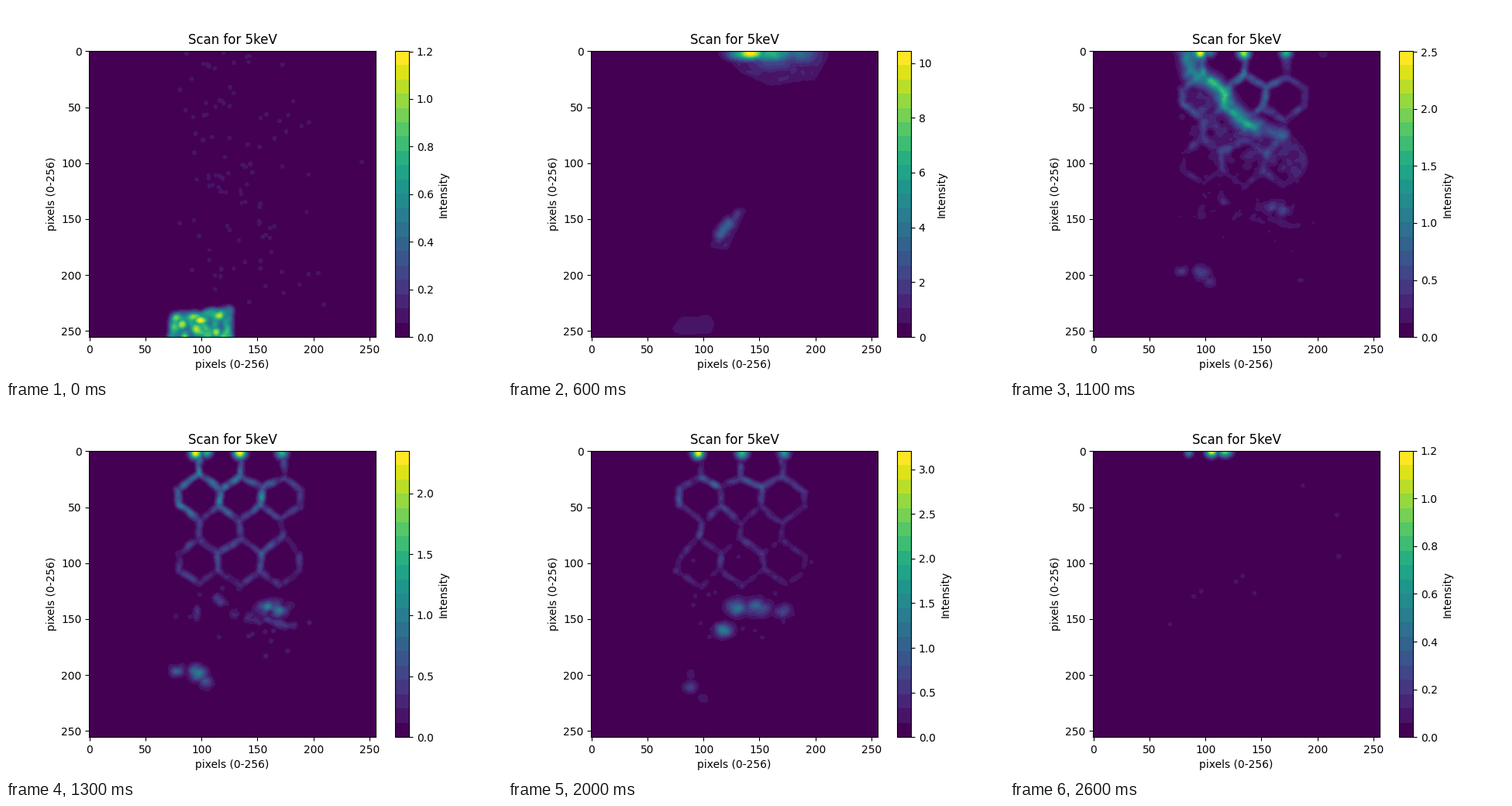
Animation of 640 by 480 pixels, one loop 2.7 s. Source, as a matplotlib script:

```python
import numpy as np
import matplotlib.pyplot as plt
from matplotlib.animation import FuncAnimation
from matplotlib.path import Path

N = 256
FRAMES, INTERVAL = 27, 100
BANDS = 20
TOP = 58

# Shapes are placed in stage pixels; the grid maps them onto the scan.
STEP = 369.6 / N
PIX = STEP * (np.arange(N) + 0.5)
X, Y = np.meshgrid(107.2 + PIX, 57.6 + PIX)


def blur(a, s):
    i = np.arange(N)
    k = np.exp(-((i[:, None] - i) / s) ** 2 / 2)
    k /= k.sum(axis=1, keepdims=True)
    return k @ a @ k.T


def rough(field, seed, depth, size=2.4):
    """Make a field lumpy with smooth noise."""
    n = blur(np.random.default_rng(seed).normal(size=(N, N)), size)
    return field * np.clip(1 + depth * n / n.std(), 0.1, None)


def blob(x, y, amp, sx, sy=None):
    sy = sy or sx
    return amp * np.exp(-((X - x) / sx) ** 2 / 2 - ((Y - y) / sy) ** 2 / 2)


def scatter(seed, count, amp, xs, ys):
    """Single counts: triangular spread in x, even spread in y."""
    rng = np.random.default_rng(seed)
    spots = zip(rng.triangular(*xs, count), rng.uniform(*ys, count))
    return np.max([blob(x, y, amp, 2.7) for x, y in spots], axis=0)


def stroke(amp, width, *pts):
    """Soft line through the points."""
    d2 = np.full((N, N), np.inf)
    for (x0, y0), (x1, y1) in zip(pts, pts[1:]):
        dx, dy = x1 - x0, y1 - y0
        t = np.clip(((X - x0) * dx + (Y - y0) * dy) / (dx * dx + dy * dy), 0, 1)
        d2 = np.minimum(d2, (X - x0 - t * dx) ** 2 + (Y - y0 - t * dy) ** 2)
    return amp * np.exp(-d2 / (2 * width ** 2))


def patch(amp, soft, *pts):
    """Soft-edged polygon."""
    grid = np.column_stack([X.ravel(), Y.ravel()])
    inside = Path(pts).contains_points(grid).reshape(N, N).astype(float)
    return amp * blur(inside, soft)


def honeycomb(seed, amp, rows=4, cols=7):
    """Hanging net of hexagons that fades downwards and to the right."""
    rng = np.random.default_rng(seed)
    node = {(k, j): (222 + 26.6 * j + rng.normal(0, 2),
                     90 + 41 * k + 18 * ((j + k) % 2 == 0) + rng.normal(0, 2))
            for k in range(rows) for j in range(cols)}
    parts = []
    for (k, j), here in node.items():
        ends = [node.get((k, j + 1))]
        if (j + k) % 2 == 0:
            ends.append(node.get((k + 1, j)))
        elif k == 0:
            ends.append((here[0], TOP))
        fade = 0.82 ** k * (0.65 if j > 4 else 1)
        parts += [stroke(amp * fade * rng.uniform(0.6, 1.15), 3.5, here, end)
                  for end in ends if end]
    return rough(np.max(parts, axis=0), seed, 0.28)


def drops(*amps):
    """Bright beads where the net hangs from the upper edge."""
    return np.max([blob(x, TOP + 3, a, 5.5) for x, a in zip((245, 302, 356), amps)], axis=0)


def layers(*parts):
    f = np.max(parts, axis=0)
    return f / f.max()


def block():
    body = patch(0.72, 2.2, (213, 397), (250, 394), (292, 388), (292, 450), (207, 450))
    return layers(
        rough(body, 3, 0.22),
        blob(227, 411, 1.15, 6), blob(252, 406, 1.15, 8, 5), blob(271, 421, 1.05, 6),
        scatter(5, 100, 0.11, (222, 262, 395), (60, 385)),
        scatter(6, 6, 0.11, (330, 400, 470), (190, 420)))


def cap():
    shelf = patch(0.95, 1.8, (274, 40), (274, 60), (300, 86), (335, 104), (398, 96),
                  (410, 70), (410, 40))
    tail = patch(1.1, 1.6, (260, 311), (268, 290), (300, 260), (309, 261), (283, 316))
    rest = patch(0.85, 1.6, (211, 416), (222, 402), (262, 398), (268, 408), (262, 425),
                 (217, 425))
    return layers(
        rough(np.max([shelf, tail, rest], axis=0), 11, 0.1),
        blob(312, 62, 10.4, 17, 6), blob(338, 61, 6.5, 24, 9), blob(375, 60, 3.8, 20, 12),
        blob(340, 72, 2.4, 28, 11),
        stroke(3.3, 6, (274, 295), (285, 281)), stroke(1.8, 4.5, (272, 302), (297, 268)))


def front():
    ridge = ((228, TOP), (234, 84), (266, 104), (282, 128), (300, 149), (318, 158))
    body = np.max([stroke(1.75, 9, *ridge),
                   stroke(1.1, 7, ridge[-1], (350, 166)),
                   stroke(0.5, 8, (350, 166), (366, 211)),
                   stroke(2.4, 6.5, (258, 98), (278, 114)),
                   stroke(2.2, 6, (298, 147), (316, 158))], axis=0)
    halo = patch(0.36, 7, (222, 90), (219, 150), (250, 200), (300, 205), (345, 222),
                 (382, 208), (378, 180), (345, 155), (280, 120))
    window = patch(1, 2, (262, 40), (415, 40), (415, 152), (330, 152), (285, 110))
    return layers(
        rough(body, 22, 0.1), rough(halo, 23, 0.42),
        window * honeycomb(24, 0.6), drops(1.9, 1.6, 1.0), blob(404, 62, 0.45, 5),
        scatter(25, 24, 0.23, (222, 260, 385), (215, 280)),
        blob(375, 354, 0.26, 6, 4))


def mesh_open():
    clumps = np.max([blob(344, 262, 0.9, 13, 7), blob(247, 345, 0.8, 8, 7),
                     blob(221, 341, 0.6, 7, 6), blob(259, 357, 0.45, 7),
                     blob(246, 268, 0.3, 4, 8)], axis=0)
    return layers(
        drops(2.3, 2.35, 1.3), blob(259, 60, 1.3, 5), honeycomb(31, 0.62),
        rough(clumps, 32, 0.22),
        rough(stroke(0.23, 5, (268, 245), (295, 270), (370, 285)), 33, 0.5),
        scatter(34, 18, 0.22, (215, 240, 395), (235, 330)))


def mesh_wide():
    clumps = np.max([blob(300, 257, 1.1, 12, 8), blob(340, 257, 1.1, 9, 7),
                     blob(322, 262, 0.9, 18, 7), blob(358, 266, 0.6, 8, 7),
                     blob(276, 287, 0.6, 8, 5), blob(376, 288, 0.35, 7, 5),
                     blob(228, 345, 0.5, 8, 9), blob(262, 377, 0.28, 7, 5)], axis=0)
    return layers(
        drops(2.55, 2.5, 1.4), honeycomb(41, 0.58), rough(clumps, 42, 0.15),
        scatter(43, 20, 0.23, (220, 245, 402), (145, 330)),
        scatter(44, 8, 0.23, (215, 250, 380), (335, 410)))


def mesh_thin():
    clumps = np.max([blob(296, 260, 0.95, 11, 8), blob(322, 260, 1, 12, 8),
                     blob(355, 265, 0.55, 10, 7), blob(279, 290, 1, 9, 7),
                     blob(235, 363, 0.5, 7, 6), blob(236, 346, 0.3, 5),
                     blob(251, 378, 0.3, 6, 5)], axis=0)
    return layers(
        drops(3.2, 2.5, 1.6), honeycomb(51, 0.62), rough(clumps, 52, 0.15),
        scatter(53, 22, 0.28, (220, 245, 398), (190, 300)))


def faint():
    return layers(
        blob(231, 61, 0.4, 4), blob(260, 59, 1.2, 5), blob(278, 59, 0.85, 6, 5),
        scatter(61, 9, 0.1, (130, 230, 435), (85, 320)))


# Frame index, shape of the scan, peak intensity.
KEYS = [(0, block(), 1.203), (6, cap(), 10.45), (9, front(), 2.68), (13, mesh_open(), 2.35),
        (16, mesh_wide(), 2.57), (20, mesh_thin(), 3.21), (26, faint(), 1.2)]


def scan(i):
    """Blend the neighbouring shapes and scale the peak geometrically."""
    for (a, f, top_f), (b, g, top_g) in zip(KEYS, KEYS[1:]):
        if i <= b:
            break
    t = (i - a) / (b - a)
    field = rough((1 - t) * f + t * g, 100 + i, 0.06)
    peak = top_f ** (1 - t) * top_g ** t
    return field / field.max() * peak, peak


fig = plt.figure(figsize=(6.4, 4.8), dpi=100)
cmap = plt.get_cmap("viridis", BANDS)


def draw(i):
    fig.clear()
    field, peak = scan(i)
    ax = fig.add_subplot()
    image = ax.imshow(field, cmap=cmap, vmin=0, vmax=peak)
    ax.set_xticks(range(0, N, 50))
    ax.set_title("Scan for 5keV")
    ax.set_xlabel("pixels (0-256)")
    ax.set_ylabel("pixels (0-256)")
    fig.colorbar(image, ax=ax, label="Intensity")
    return []


anim = FuncAnimation(fig, draw, frames=FRAMES, interval=INTERVAL,
                     init_func=lambda: [], repeat=True, repeat_delay=0)
plt.show()
```
